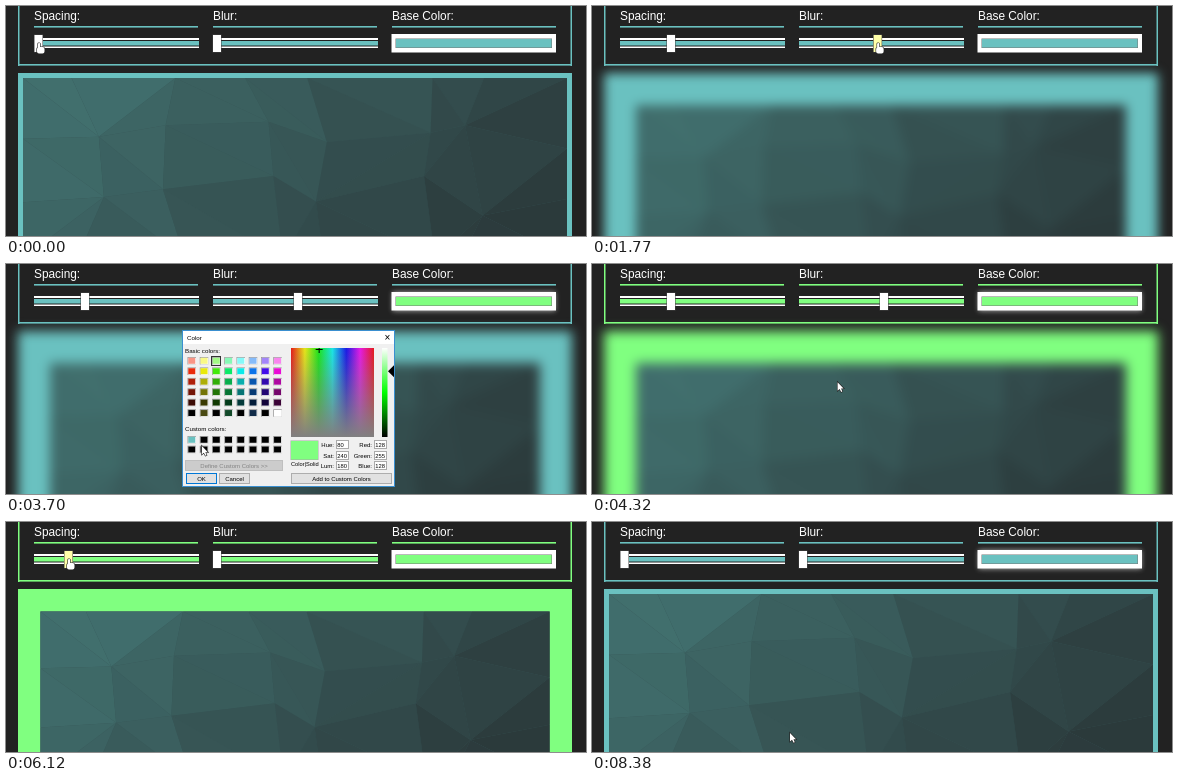
An HTML page with a canvas that plays this animation: 580 by 230 pixels, repeating every 8610 ms.

```html
<!DOCTYPE html>
<html lang="en">
<head>
<meta charset="utf-8">
<title>Live style controls</title>
<style>
html, body { margin: 0; width: 100%; height: 100%; overflow: hidden; background: #222; }
canvas { display: block; }
</style>
</head>
<body>
<canvas id="stage" width="580" height="230"></canvas>
<script>
const LOOP = 8610;
const TEAL = '#6ac1c0', GREEN = '#80ff80', DARK = '#222';
const SPACING_X = 32.5, BLUR_X = 211, SLIDER_Y = 37;
const ctx = document.getElementById('stage').getContext('2d');

// Pointer moves; a drag takes its slider's thumb along.
const move = (start, end, x, y, drag) => ({ start, end, x, y, drag });
const moves = [
  move(60, 720, 79, SLIDER_Y, 'spacing'),
  move(740, 970, BLUR_X, SLIDER_Y),
  move(1150, 1900, 292, SLIDER_Y, 'blur'),
  move(2070, 2650, 464, 52),
  move(2880, 3150, 207, 95),
  move(3380, 3860, 192, 212),
  move(4080, 4540, 292, SLIDER_Y),
  move(4600, 5210, BLUR_X, SLIDER_Y, 'blur'),
  move(5330, 5640, 79, SLIDER_Y),
  move(5920, 6420, SPACING_X, SLIDER_Y, 'spacing'),
  move(6500, 6800, 465, SLIDER_Y),
  move(6980, 7430, 190, 176),
  move(7580, 7900, 198, 211)
];

function poseAt(t) {
  const pose = { x: SPACING_X, y: SLIDER_Y, spacing: SPACING_X, blur: BLUR_X, held: '' };
  for (const { start, end, x, y, drag } of moves) {
    if (t < start) break;
    const u = Math.min(1, (t - start) / (end - start)), ease = u * u * (3 - 2 * u);
    pose.x += (x - pose.x) * ease;
    pose.y += (y - pose.y) * ease;
    if (drag) pose[drag] = pose.x;
    pose.held = t < end + 30 ? drag : '';
  }
  return pose;
}

function rect(x, y, w, h, fill, c = ctx) {
  c.fillStyle = fill;
  c.fillRect(x, y, w, h);
}
function frame(x, y, w, h, color) {
  ctx.strokeStyle = color;
  ctx.lineWidth = 1;
  ctx.strokeRect(x + .5, y + .5, w - 1, h - 1);
}
function text(str, x, y, size, color, align = 'left') {
  ctx.font = `${size}px Arial, "Liberation Sans", sans-serif`;
  ctx.textAlign = align;
  ctx.fillStyle = color;
  ctx.fillText(str, x, y);
}
function ramp(x0, y0, x1, y1, colors) {
  const g = ctx.createLinearGradient(x0, y0, x1, y1);
  colors.forEach((c, i) => g.addColorStop(i / (colors.length - 1), c));
  return g;
}
function shape(points, fill, c = ctx) {
  c.beginPath();
  points.forEach(p => c.lineTo(...p));
  c.closePath();
  c.fillStyle = fill;
  c.fill();
}

// Low-poly picture: a jittered grid, each cell split into two shaded triangles.
const PIC_W = 544, PIC_H = 180, COLS = 7, ROWS = 3;
let seed = 11;
const random = () => (seed = seed * 16807 % 2147483647) / 2147483647;
const jitter = (i, n) => (i + (i % n ? (random() - .5) * .75 : 0)) / n;
const grid = Array.from({ length: ROWS + 1 }, (_, r) =>
  Array.from({ length: COLS + 1 }, (_, c) => [PIC_W * jitter(c, COLS), PIC_H * jitter(r, ROWS)]));

function facet(...pts) {
  const [x, y] = [0, 1].map(k => pts.reduce((sum, p) => sum + p[k], 0) / 3);
  const k = .75 * x / PIC_W + .25 * y / PIC_H + (random() - .5) * .08;
  const mix = (from, to) => Math.round(from + (to - from) * k);
  return { pts, color: `rgb(${mix(68, 40)},${mix(118, 50)},${mix(116, 52)})` };
}
const facets = [];
for (let r = 0; r < ROWS; r++) {
  for (let c = 0; c < COLS; c++) {
    const [a, b] = grid[r].slice(c, c + 2), [d, e] = grid[r + 1].slice(c, c + 2);
    if (random() < .5) facets.push(facet(a, b, d), facet(b, e, d));
    else facets.push(facet(a, b, e), facet(a, e, d));
  }
}

const photo = document.createElement('canvas');
photo.width = 554;
photo.height = 220;
const pc = photo.getContext('2d');

function drawPhoto(pad, blur, color) {
  rect(0, 0, 554, 220, color, pc);
  const scale = (554 - 2 * pad) / PIC_W;
  pc.save();
  pc.translate(pad, pad);
  pc.scale(scale, scale);
  rect(0, 0, PIC_W, 250, '#375556', pc);
  facets.forEach(f => shape(f.pts, f.color, pc));
  pc.restore();
  ctx.filter = blur > .05 ? `blur(${blur}px)` : 'none';
  ctx.drawImage(photo, 12, 67);
  ctx.filter = 'none';
}

function slider(x, thumb, color, held) {
  rect(x, 32, 165, 10, '#fff');
  rect(x, 34, 165, 6.5, DARK);
  rect(x, 35, 165, 4.5, color);
  rect(thumb - 4.5, 28.5, 9, 18, '#444');
  rect(thumb - 4, 29, 8, 17, held ? '#ffffa8' : '#fff');
}

function drawControls(color, picked, pose, focused) {
  rect(12, 0, 1.5, 60, color);
  rect(564.5, 0, 1.5, 60, color);
  rect(12, 58, 554, 1.6, color);
  [['Spacing:', 28], ['Blur:', 207], ['Base Color:', 386]].forEach(([label, x]) => {
    text(label, x, 14, 11.85, '#fff');
    rect(x, 20, 164, 1.6, color);
  });
  slider(28, pose.spacing, color, pose.held === 'spacing');
  slider(207, pose.blur, color, pose.held === 'blur');
  ctx.save();
  if (focused) {
    ctx.shadowColor = 'rgba(255,255,255,.6)';
    ctx.shadowBlur = 5;
  }
  rect(385.5, 28, 164.5, 18.5, '#fff');
  ctx.restore();
  rect(389.5, 32.5, 156.5, 9.5, '#777');
  rect(390, 33, 155.5, 8.5, picked);
}

// Channel values of a colour, with hue, saturation and lightness on a 240 scale.
function channels(hex) {
  const [Red, Green, Blue] = [1, 3, 5].map(i => parseInt(hex.slice(i, i + 2), 16));
  const max = Math.max(Red, Green, Blue), min = Math.min(Red, Green, Blue), span = max - min;
  const sextant = max === Green ? 2 + (Blue - Red) / span : 4 + (Red - Green) / span;
  return {
    Hue: Math.round(sextant * 40),
    Sat: Math.round(240 * span / (255 - Math.abs(max + min - 255))),
    Lum: Math.round(240 * (max + min) / 510),
    Red, Green, Blue
  };
}

const hues = [8, 60, 105, 145, 180, 212, 255, 305];
function basicColor(col, row) {
  if (row === 5) return col === 7 ? '#fff' : `hsl(${hues[col]} 60% ${col % 2 * 18}%)`;
  return `hsl(${hues[col]} 90% ${row ? 60 - row * 12 : 75}%)`;
}
function swatch(x, y, color) {
  rect(x, y, 8.5, 7.5, '#999');
  rect(x + .8, y + .8, 7.7, 6.7, '#fff');
  rect(x + .8, y + .8, 7, 6, color);
}
function button(label, x, y, w, h, border = '#adadad', fill = '#e1e1e1', ink = '#000') {
  rect(x, y, w, h, fill);
  frame(x, y, w, h, border);
  text(label, x + w / 2, y + h / 2 + 2.2, 6, ink, 'center');
}

function drawPalette(color) {
  text('Basic colors:', 3, 22.7, 6.2, '#000');
  text('Custom colors:', 3, 100.7, 6.2, '#000');
  for (let col = 0; col < 8; col++) {
    const x = 5.5 + col * 12.25;
    for (let row = 0; row < 6; row++) swatch(x, 27 + row * 10.45, basicColor(col, row));
    for (let row = 0; row < 2; row++) swatch(x, 106 + row * 9.7, col || row ? '#000' : TEAL);
  }
  if (color === GREEN) frame(29, 26, 10, 10, '#333');
  button('Define Custom Colors >>', 3, 130, 98, 11, '#bfbfbf', '#ccc', '#838383');
  button('OK', 4, 143, 31, 11, '#0078d7');
  button('Cancel', 37, 143, 31, 11);
}

function drawMixer(color) {
  const v = channels(color), left = 109, top = 18, w = 83, h = 89;
  const rainbow = Array.from({ length: 7 }, (_, i) => `hsl(${i * 60} 80% 50%)`);
  rect(left, top, w, h, ramp(left, 0, left + w, 0, rainbow));
  rect(left, top, w, h, ramp(0, top, 0, top + h, ['rgba(128,128,128,0)', '#808080']));
  const x = left + w * v.Hue / 240, y = top + 1 + h * (1 - v.Sat / 240);
  rect(x - 3, y, 7, 1, '#000');
  rect(x, Math.max(top, y - 3), 1, 5, '#000');

  const pure = `hsl(${v.Hue * 1.5} ${v.Sat / 2.4}% 50%)`;
  rect(200, top, 5.5, h, ramp(0, top, 0, top + h, ['#fff', pure, '#000']));
  const mark = top + 1 + h * (1 - v.Lum / 240);
  shape([[206, mark], [212, mark - 6], [212, mark + 6]], '#000');

  rect(108.5, 110.5, 28, 19.5, '#aaa');
  rect(left, 111, 27, 18.5, color);
  text('Color|Solid', left, 136, 5.7, '#000');
  Object.entries(v).forEach(([name, value], i) => {
    const fx = i < 3 ? 154 : 192, fy = Math.round(110 + i % 3 * 10.5);
    text(name + ':', fx - 2, fy + 6.5, 6, '#000', 'right');
    rect(fx, fy, 13, 9, '#fff');
    frame(fx, fy, 13, 9, '#aaa');
    text(value, fx + 1.3, fy + 6.5, 5.8, '#000');
  });
  button('Add to Custom Colors', left, 143, 101, 11);
}

function drawDialog(x, y, color) {
  ctx.save();
  ctx.translate(x, y);
  rect(0, 0, 213, 157, '#f0f0f0');
  rect(0, 0, 213, 14, '#fff');
  frame(0, 0, 213, 157, '#3a8fd0');
  text('Color', 5, 9.5, 6.2, '#000');
  text('×', 205.5, 10.5, 10, '#000', 'center');
  drawPalette(color);
  drawMixer(color);
  ctx.restore();
}

function drawPointer({ x, y }) {
  const onSlider = y > 28 && y < 46 && (x >= 28 && x < 193 || x >= 207 && x < 371);
  ctx.save();
  ctx.translate(x, y);
  ctx.beginPath();
  if (onSlider) {
    ctx.roundRect(-.5, 0, 2.2, 7, 1);
    ctx.roundRect(-1.5, 4, 7.5, 6.5, 2);
  } else {
    ctx.moveTo(0, 0);
    ctx.lineTo(0, 8.5);
    ctx.lineTo(2, 6.8);
    ctx.lineTo(3.6, 9.8);
    ctx.lineTo(4.8, 9.2);
    ctx.lineTo(3.5, 6.2);
    ctx.lineTo(6, 6.2);
    ctx.closePath();
  }
  ctx.strokeStyle = '#222';
  ctx.lineWidth = 1.2;
  ctx.stroke();
  ctx.fillStyle = '#fff';
  ctx.fill();
  ctx.restore();
}

function draw(t) {
  const within = (from, to) => t >= from && t < to;
  const pose = poseAt(t);
  const color = within(4080, 8220) ? GREEN : TEAL;
  const picked = within(3450, 7560) ? GREEN : TEAL;
  const focused = within(2650, 4600) || t >= 6800;

  rect(0, 0, 580, 230, DARK);
  drawPhoto(5 + (pose.spacing - SPACING_X) * .58, (pose.blur - BLUR_X) * .074, color);
  drawControls(color, picked, pose, focused);
  if (within(2700, 4080)) drawDialog(176, 66, picked);
  if (within(6980, 8220)) drawDialog(182, 67, picked);
  drawPointer(pose);
}

function tick() {
  draw(performance.now() % LOOP);
  requestAnimationFrame(tick);
}
tick();
</script>
</body>
</html>
```
